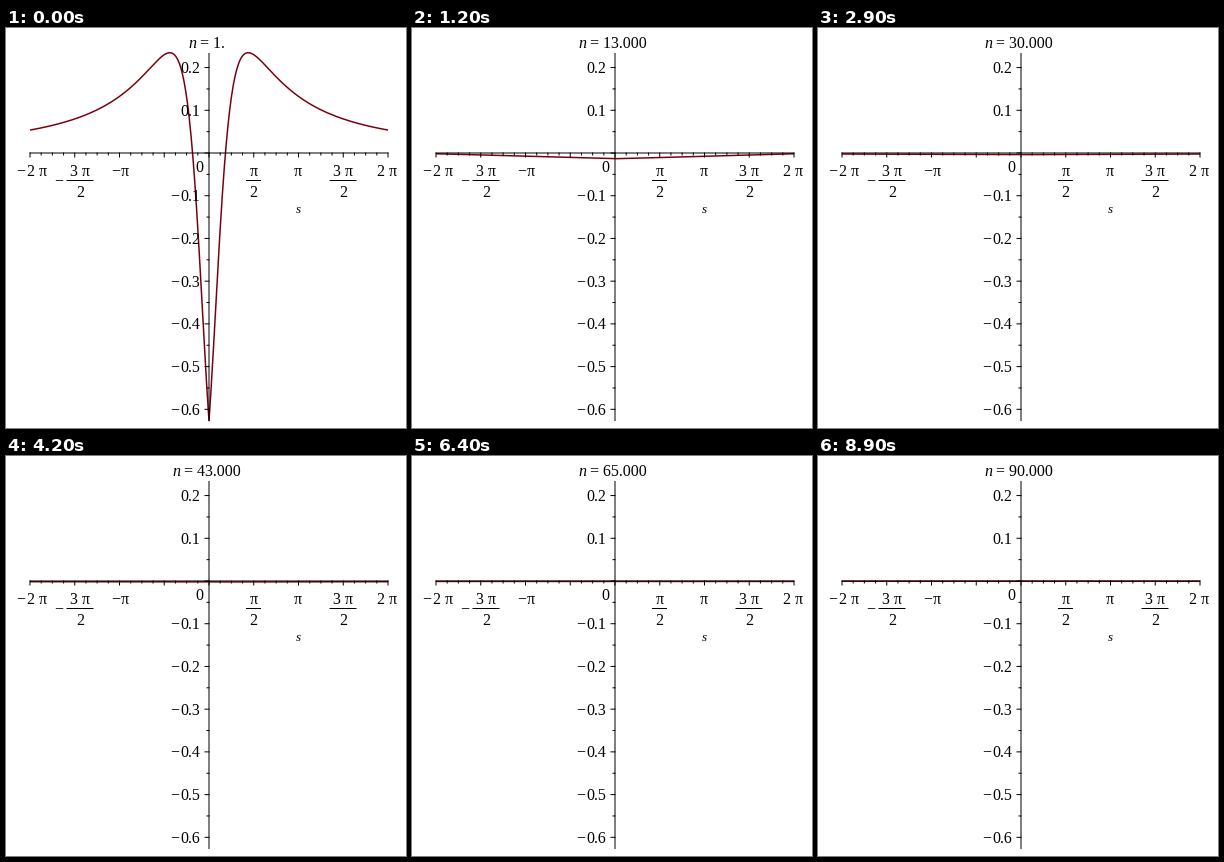
Animation, 400 px wide and 400 px high, one loop 9 s. Source, as a matplotlib script:

```python
import math

import numpy as np
import matplotlib.pyplot as plt
from matplotlib.animation import FuncAnimation

SIZE, DPI = 400, 100
PX = 72 / DPI                      # one pixel in points
X0, Y0 = 203, 125                  # axes crossing
X_SCALE = 179 / (2 * math.pi)
Y_SCALE = 427.2
FRAMES = 90
SERIF = "Liberation Serif"

fig = plt.figure(figsize=(SIZE / DPI, SIZE / DPI), dpi=DPI, facecolor="white")
ax = fig.add_axes([0, 0, 1, 1])
ax.set_xlim(0, SIZE)
ax.set_ylim(SIZE, 0)
ax.axis("off")


def segment(x1, y1, x2, y2):
    ax.plot([x1, x2], [y1, y2], color="black", lw=PX, snap=False,
            solid_capstyle="projecting", zorder=3)


def label(x, baseline, text, ha="center", size=16, style="normal"):
    return ax.text(x, baseline, text, ha=ha, va="baseline", family=SERIF,
                   fontsize=size * PX, style=style, color="black", zorder=4)


def fraction(x, top, width):
    label(x, 148, top)
    segment(x - width / 2, 152.5, x + width / 2, 152.5)
    label(x, 169, "2")


def draw_axes():
    segment(X0 - 179, Y0, X0 + 179, Y0)
    segment(X0, 25.5, X0, 392.5)

    for k in range(-16, 17):
        x = X0 + k * math.pi / 8 * X_SCALE
        segment(x, Y0, x, Y0 + (4 if k % 4 == 0 else 2))
    for k in range(-12, 5):
        y = Y0 - k * 0.05 * Y_SCALE
        segment(X0 - (4 if k % 2 == 0 else 2), y, X0, y)
        if k % 2 == 0 and k != 0:
            baseline = round(y + 5.4)
            label(194.5, baseline, f"{abs(k) / 20:.1f}", ha="right")
            if k < 0:
                label(164, baseline, "\u2212", ha="left")

    label(193.5, 144, "0")
    label(10, 148, "\u2212", ha="left")
    label(31, 148, "2 \u03c0")
    label(48.5, 158, "\u2212", ha="left")
    fraction(74, "3 \u03c0", 26)
    label(105, 148, "\u2212", ha="left")
    label(119, 148, "\u03c0")
    fraction(247.5, "\u03c0", 14)
    label(291.5, 148, "\u03c0")
    fraction(337, "3 \u03c0", 26)
    label(381.5, 148, "2 \u03c0")
    label(292.5, 185, "s", size=13, style="italic")


def response(s, n):
    """Decaying transform with a cusp at s = 0."""
    phase = 1.5 * np.arctan(np.abs(s) / n) + math.pi / 4
    return -math.gamma(1.5) * (n * n + s * s) ** -0.75 * np.cos(phase)


def number(n):
    if n == 1:
        return "1."
    return f"{n:.4f}" if n < 10 else f"{n:.3f}"


draw_axes()
s = np.linspace(-2 * math.pi, 2 * math.pi, 401)
curve, = ax.plot([], [], color="#78000e", lw=1.5 * PX, zorder=2, snap=False,
                 solid_joinstyle="round", solid_capstyle="butt")
name = label(0, 20, "n", ha="left", style="italic")
value = label(0, 20, "", ha="left")


def update(i):
    n = i + 1
    curve.set_data(X0 + s * X_SCALE, Y0 - response(s, n) * Y_SCALE)
    left = 182 if n == 1 else 166
    name.set_x(left)
    value.set_x(left + 12)
    value.set_text("= " + number(n))
    return curve, name, value


anim = FuncAnimation(fig, update, frames=FRAMES, interval=100,
                     repeat=True, repeat_delay=0, blit=False)
plt.show()
```
